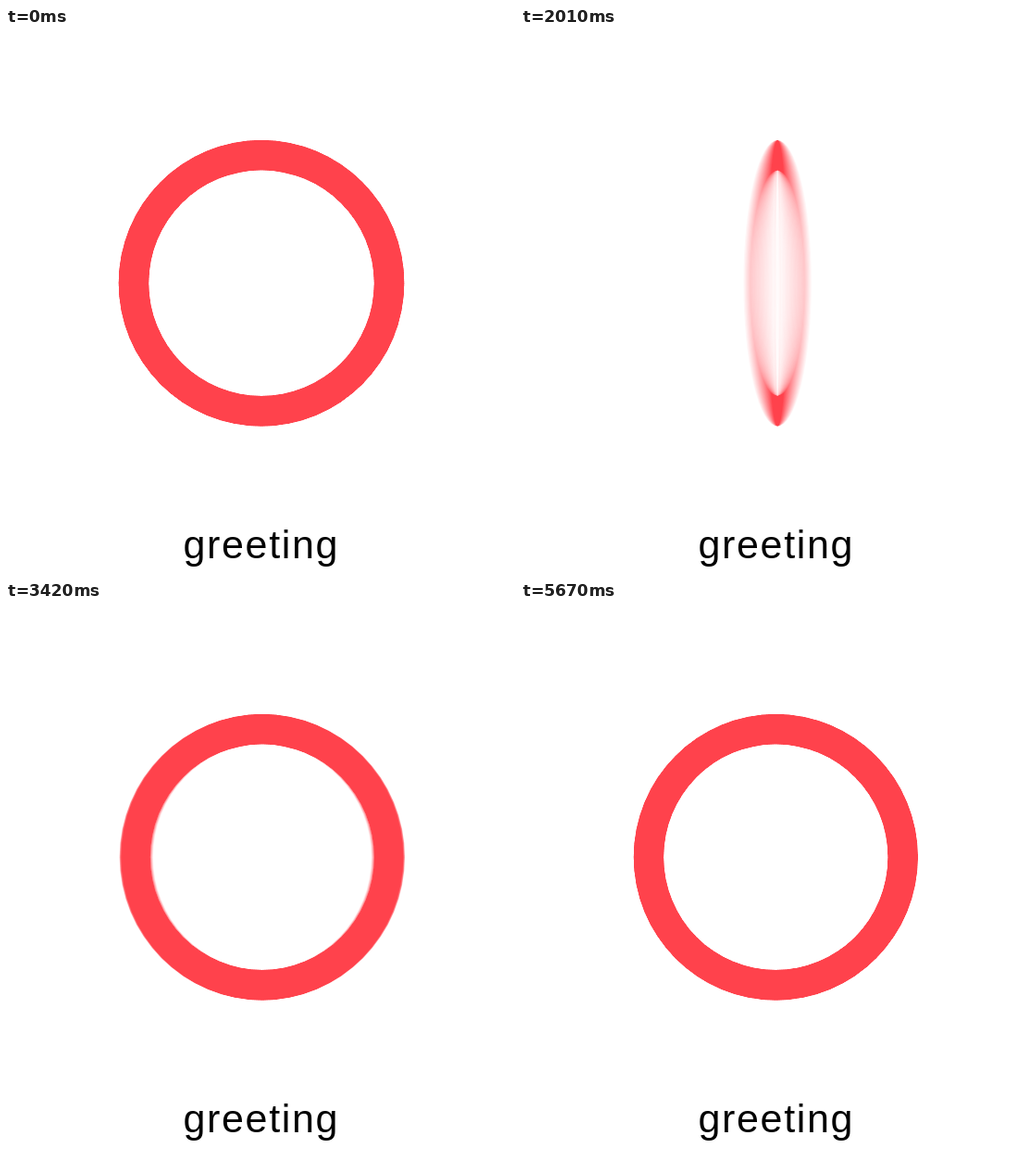
Write an HTML page with a canvas that moves like this. It is 550 px wide and 589 px high and loops after 5.7 s.

```html
<!DOCTYPE html>
<html lang="en">
<head>
<meta charset="utf-8">
<title>greeting</title>
<style>
  html, body { margin: 0; width: 100%; height: 100%; overflow: hidden; background: #fff; }
  canvas { display: block; }
</style>
</head>
<body>
<canvas id="stage" width="550" height="589"></canvas>
<script>
const W = 550, H = 589, STEP = 30, LOOP = 5700;
const RED = '#ff424c';
const OUTER = 154.2, INNER = 121.9, AXIS_X = 275, MID_Y = 275.2;
const SHUTTER = 0.58, SAMPLES = 32, EXPOSURE = 1.5;

// Spin: [step, angle in degrees, degrees per step]
const KEYS = [
  [0, 0, 0.3], [21, 21, 2.8], [40, 215, 18], [55, 548, 17], [94, 1620, 28],
  [114, 2167, 28], [142, 3008.5, 29], [160, 3430, 16], [180, 3590, 1], [190, 3594.6, 0.3]
];

const ctx = document.getElementById('stage').getContext('2d');
const layer = document.createElement('canvas');
layer.width = W;
layer.height = H;
const ink = layer.getContext('2d');

// Cubic Hermite interpolation between the keys, in radians
function angleAt(step) {
  const s = Math.max(0, Math.min(190, step));
  let i = 0;
  while (i < KEYS.length - 2 && s > KEYS[i + 1][0]) i++;
  const [s0, a0, v0] = KEYS[i], [s1, a1, v1] = KEYS[i + 1];
  const d = s1 - s0, u = (s - s0) / d, w = 1 - u;
  const deg = w * w * ((1 + 2 * u) * a0 + u * d * v0) + u * u * ((3 - 2 * u) * a1 - w * d * v1);
  return deg * Math.PI / 180;
}

// The ring turns slightly off its axis, so its centre sways
function centreAt(step) {
  const a = angleAt(step), c = Math.cos(a), s = Math.sin(a);
  return AXIS_X + c + s * (4.3 * c + 2.7);
}

function addRing(x, squeeze) {
  ink.beginPath();
  ink.ellipse(x, MID_Y, OUTER * squeeze, OUTER, 0, 0, Math.PI * 2);
  ink.closePath();
  ink.moveTo(x + INNER * squeeze, MID_Y);
  ink.ellipse(x, MID_Y, INNER * squeeze, INNER, 0, 0, Math.PI * 2);
  ink.fill('evenodd');
}

function drawRing(step) {
  ink.globalCompositeOperation = 'source-over';
  ink.globalAlpha = 1;
  ink.clearRect(0, 0, W, H);

  // Motion blur: add up the coverage over the open shutter
  ink.globalCompositeOperation = 'lighter';
  ink.globalAlpha = EXPOSURE / SAMPLES;
  ink.fillStyle = '#000';
  const x = centreAt(step);
  for (let i = 0; i < SAMPLES; i++) {
    const a = angleAt(step + SHUTTER * ((i + 0.5) / SAMPLES - 0.5));
    addRing(x, Math.abs(Math.cos(a)));
  }

  ink.globalCompositeOperation = 'source-in';
  ink.globalAlpha = 1;
  ink.fillStyle = RED;
  ink.fillRect(0, 0, W, H);
  ctx.drawImage(layer, 0, 0);
}

function drawLabel() {
  ctx.fillStyle = '#000';
  ctx.font = '43px "Liberation Sans", Arial, sans-serif';
  ctx.letterSpacing = '1.65px';
  ctx.fillText('greeting', 191.5, 572);
}

const start = performance.now();
let shown = -1;

function tick() {
  const t = Math.max(0, performance.now() - start) % LOOP;
  const step = Math.floor(t / STEP);
  if (step !== shown) {
    shown = step;
    ctx.fillStyle = '#fff';
    ctx.fillRect(0, 0, W, H);
    drawRing(step);
    drawLabel();
  }
  requestAnimationFrame(tick);
}
tick();
</script>
</body>
</html>
```
